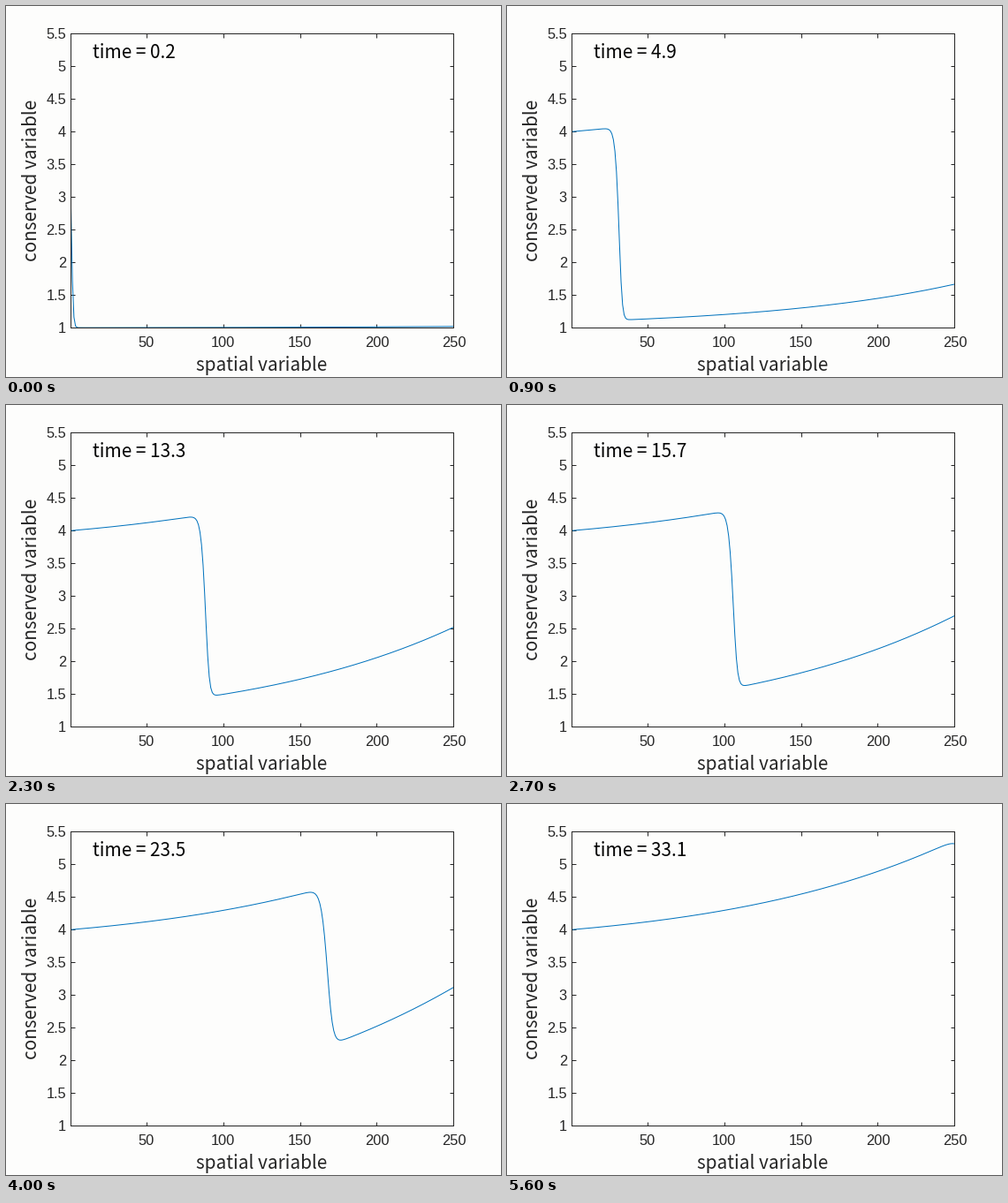
Animation of 560 by 420 pixels, one loop 5.7 s. Source, as a matplotlib script:

```python
import numpy as np
import matplotlib.pyplot as plt
from matplotlib.animation import FuncAnimation

W, H, DPI = 560, 420, 100
FRAMES, INTERVAL = 57, 100
CELLS, DX, DT = 250, 0.4, 0.05
FIRST_STEP, STRIDE = 3, 12
INLET, SOURCE = 4.0, 0.02
PAPER, INK, BLUE = "#fdfdfc", "#262626", "#0072bd"

plt.rcParams["font.family"] = "Liberation Sans"


def px(n):
    """Pixels to points."""
    return n * 72 / DPI


def solve(steps):
    """Burgers' equation with an exponential source, implicit upwind."""
    a = DT / (2 * DX)
    src = (DT * SOURCE * np.exp(SOURCE * DX * np.arange(1, CELLS + 1))).tolist()
    u = [1.0] * CELLS
    history = [u]
    for _ in range(steps):
        left, new = INLET, []
        for old, s in zip(u, src):
            rhs = old + s + a * left * left
            left = ((1 + 4 * a * rhs) ** 0.5 - 1) / (2 * a)
            new.append(left)
        u = new
        history.append(u)
    return np.array(history)


def step_at(frame):
    # the opening state is held for two frames
    return max(STRIDE * (frame - 1) + 1, FIRST_STEP)


def clock(step):
    return f"time = {(step + 1) * DT:.1f}"


history = solve(step_at(FRAMES - 1))
cells = np.arange(1, CELLS + 1)

fig = plt.figure(figsize=(W / DPI, H / DPI), dpi=DPI, facecolor=PAPER)
x0, x1, top, bottom = 73.4, 506.4, 31.4, 364.4
ax = fig.add_axes([x0 / W, 1 - bottom / H, (x1 - x0) / W, (bottom - top) / H],
                  facecolor=PAPER)
ax.set(xlim=(1, CELLS), ylim=(1, 5.5))
ax.set_xticks(range(50, 251, 50))
ticks = np.arange(1, 5.6, 0.5)
ax.set_yticks(ticks, [f"{v:g}" for v in ticks])
ax.tick_params(direction="in", top=True, right=True, length=px(4.5),
               width=px(1), color=INK, labelsize=px(16.4), labelcolor=INK)
ax.tick_params(axis="x", pad=px(9.5))
ax.tick_params(axis="y", pad=px(5.5))
for spine in ax.spines.values():
    spine.set(linewidth=px(1), color=INK)


def label(x, y, text, **kw):
    style = dict(fontsize=px(20.8), color=INK, va="baseline", ha="center",
                 family="Noto Sans CJK JP")
    return fig.text(x / W, 1 - y / H, text, **{**style, **kw})


label(289.5, 413, "spatial variable")
label(35.5, 197, "conserved variable", rotation=90, rotation_mode="anchor")
time_text = label(98, 59, "", ha="left", color="#050505")
line, = ax.plot([], [], color=BLUE, lw=px(1))


def draw(frame):
    step = step_at(frame)
    line.set_data(cells, history[step])
    time_text.set_text(clock(step))
    return line, time_text


anim = FuncAnimation(fig, draw, frames=FRAMES, interval=INTERVAL,
                     repeat=True, repeat_delay=0)
plt.show()
```
